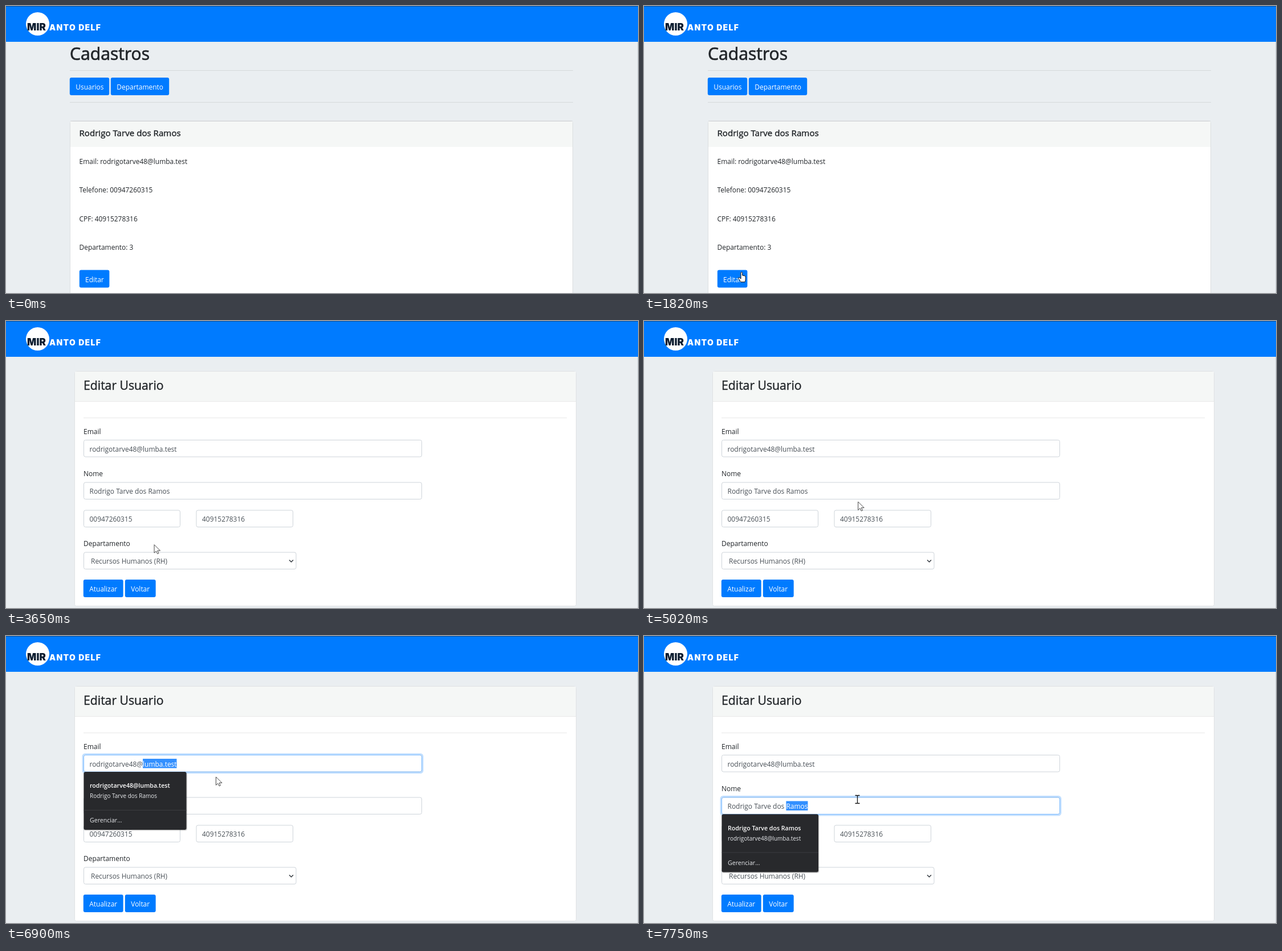
Write an HTML page that moves like this. It is 1109x505 px and loops after 8 s.

```html
<!DOCTYPE html>
<html lang="pt">
<head>
<meta charset="utf-8">
<title>Cadastros</title>
<style>
html, body { margin: 0; width: 100%; height: 100%; overflow: hidden; background: #eaeef1; }
svg { display: block; }
text { font: 11.95px "Open Sans", "Noto Sans", sans-serif; fill: #212529; white-space: pre; }
/* A thin outline stands for medium weight */
.h1, .h4, .h5 { stroke: #212529; stroke-width: .4px; }
.h1 { font-size: 30.1px; stroke-width: .7px; }
.h4 { font-size: 21.2px; }
.h5 { font-size: 15.1px; }
.val { fill: #495057; }
.on, .pick { fill: #fff; }
.strong { font-size: 10.6px; font-weight: 600; fill: #fff; }
.small { font-size: 10px; fill: #e8eaed; }
.menu { font-size: 10.6px; fill: #e8eaed; }
.url { font-size: 10px; fill: #a9abaf; }
.logo { font: 900 14px Inter, "Open Sans", sans-serif; letter-spacing: 1.3px; fill: #fff; }
.logo .dark { font-size: 17px; letter-spacing: .2px; fill: #0b1b2e; }
</style>
</head>
<body>
<script>
const NAME = ['Rodrigo Tarve dos ', 'Ramos'];
const MAIL = ['rodrigotarve48@', 'lumba.test'];
const PHONE = '00947260315', CPF = '40915278316';
const name = NAME.join(''), mail = MAIL.join('');

const rect = (x, y, w, h, fill, more = '') =>
  `<rect x="${x}" y="${y}" width="${w}" height="${h}" fill="${fill}" ${more}/>`;
const text = (x, y, s, cls = '') => `<text x="${x}" y="${y}" class="${cls}">${s}</text>`;
const line = (x, y, w) => rect(x, y, w, 1, '#000', 'opacity=".09"');
const group = (id, s) => `<g id="${id}">${s}</g>`;
const button = (x, y, w, s) => rect(x - .2, y - .4, w + .4, 30.8, '#007bff', 'rx="3"') + text(x + 10.3, y + 20.5, s, 'on');
const box = (x, y, w) => rect(x + .5, y + .5, w - 1, 29.5, '#fff', 'rx="3" stroke="#ced4da"');
const input = (x, y, w, s) => box(x, y, w) + text(x + 10.5, y + 20.5, s, 'val');

// Text field with focus glow, caret and a selectable last word
const field = (id, y, [head, tail]) => box(136, y, 594) +
  group(id + 'Glow',
    rect(134.8, y - 1.2, 596.4, 32.9, 'none', 'rx="4" stroke="#007bff" stroke-opacity=".25" stroke-width="2.5"') +
    rect(136.5, y + .5, 593, 29.5, 'none', 'rx="3" stroke="#80bdff"')) +
  `<text x="146.5" y="${y + 20.5}" class="val">${head}<tspan id="${id}Word">${tail}</tspan></text>` +
  rect(0, y + 7, 0, 16.5, '#3390ff', `id="${id}Mark"`) +
  `<text id="${id}Pick" y="${y + 20.5}" class="pick">${tail}</text>` +
  rect(0, y + 7, 1, 17, '#222', `id="${id}Caret"`);

const popup = (id, y, w, first, second) => group(id + 'Popup',
  rect(136, y + 1, w + 2, 102.5, '#000', 'rx="4" opacity=".2"') +
  rect(136.5, y, w, 102, '#28292c', 'rx="3"') +
  rect(136.5, y + 67, w, 1, '#3b3c40') +
  text(147, y + 28, first, 'strong') + text(147, y + 46, second, 'small') +
  text(147, y + 89, 'Gerenciar...', 'menu'));

const header = rect(0, 0, 1109, 63, '#007bff') + rect(0, 0, 1109, 1, '#0b4f99') +
  '<circle cx="55.5" cy="31.5" r="20.5" fill="#fff"/>' +
  '<text x="37" y="43" class="logo"><tspan class="dark">MIR</tspan><tspan x="76">ANTO DELF</tspan></text>';

const listPage = text(112, 95, 'Cadastros', 'h1') + line(112, 113, 883) +
  button(112, 126.5, 69, 'Usuarios') + button(184, 126.5, 102, 'Departamento') + line(112, 169, 883) +
  rect(112.5, 202.5, 882, 340, '#fff', 'rx="3" stroke="#dcdfe1"') +
  rect(113, 203, 881, 45, '#f5f7f6') + line(113, 202, 881) +
  text(128.5, 229, name, 'h5') +
  ['Email: ' + mail, 'Telefone: ' + PHONE, 'CPF: ' + CPF, 'Departamento: 3']
    .map((s, i) => text(128.5, 278 + i * 50.3, s)).join('') +
  group('ring', rect(127.3, 463.3, 55.9, 33.4, '#93c7ff', 'rx="4.5"') + rect(126.6, 462.6, 57.2, 34.8, '#93c7ff', 'rx="5"')) +
  button(129, 465, 52.2, '') +
  rect(128.8, 464.6, 52.6, 30.8, '#0069d9', 'rx="3" id="hover"') + text(139, 485.5, 'Editar', 'on');

const editPage = rect(120.5, 88.5, 880, 413, '#fff', 'rx="3" stroke="#dfe2e4"') +
  rect(121, 89, 879, 52, '#f5f7f6') + line(121, 141, 879) +
  text(136, 121, 'Editar Usuario', 'h4') + line(136, 170, 848) +
  text(136, 199, 'Email') + field('mail', 209, MAIL) +
  text(136, 273, 'Nome') + field('name', 283.5, NAME) +
  input(136, 332.5, 170, PHONE) + input(333.5, 332.5, 170.5, CPF) +
  text(136, 396, 'Departamento') + box(136, 406.5, 373.5) +
  text(149, 427, 'Recursos Humanos (RH)', 'val') +
  '<path d="M497 420.5l3.5 3.5 3.5-3.5" fill="none" stroke="#343a40" stroke-width="1.5"/>' +
  button(136, 455.5, 69.5, 'Atualizar') + button(209, 455.5, 53.5, 'Voltar') +
  popup('mail', 239, 180, mail, name) + popup('name', 313.5, 169.5, name, mail);

const cursor = group('cursor',
  '<circle id="click" cx="-1" cy="0" r="10.5" fill="#fff02e"/>' +
  '<path id="arrow" d="M.5.5V15l3.4-3.1L6.2 16.6l2.2-1L6.2 11H11Z" fill="#fff" stroke="#333" stroke-width=".9"/>' +
  '<path id="beam" d="M-4-7H-1Q0-7 0-6Q0-7 1-7H4M0-6V6M-4 7H-1Q0 7 0 6Q0 7 1 7H4" fill="none" stroke="#111" stroke-width="1.3"/>' +
  '<path id="hand" d="M-1.5 1.5Q-1.5.3-.2.3T1.2 1.5V6L5.2 6.8Q6.7 7.2 6.7 9V13Q6.7 15 5.4 17.6H-1.5Q-3.4 14.5-5.8 11.5Q-5.8 9.5-4 9.8L-1.5 12Z" fill="#fff" stroke="#111"/>');

document.body.innerHTML = '<svg width="1109" height="505">' + rect(0, 0, 1109, 505, '#eaeef1') + header +
  group('list', listPage) + group('edit', editPage) + rect(1108, 63, 1, 442, '#d3dae0') +
  group('status', rect(-4, 491.5, 124, 20, '#35363a', 'rx="3"') + text(0, 505, 'servidor:5050/alterar/52', 'url')) +
  cursor + '</svg>';

const el = id => document.getElementById(id);
const fade = (id, v) => el(id).setAttribute('opacity', +v);

function placeMarks(id) {
  const word = el(id + 'Word'), x = word.getStartPositionOfChar(0).x, w = word.getComputedTextLength();
  el(id + 'Mark').setAttribute('x', x);
  el(id + 'Mark').setAttribute('width', w);
  el(id + 'Pick').setAttribute('x', x);
  el(id + 'Caret').setAttribute('x', Math.round(x + w));
}
placeMarks('mail');
placeMarks('name');

// Pointer path: time, x, y
const PATH = [
  [200, 880, 446], [350, 570, 355], [580, 570, 355], [980, 294, 427], [1220, 294, 427],
  [1820, 171.5, 468], [2050, 165, 475], [2140, 165, 475], [2460, 163.5, 473], [3400, 163.5, 473],
  [3650, 259, 394], [3790, 342, 266], [3950, 342, 266], [4250, 341, 296], [4780, 374, 328],
  [4860, 376, 330], [5250, 374, 300], [5650, 366, 234], [5820, 365.5, 232.5], [6730, 365.5, 232.5],
  [7360, 374.5, 287.5], [8000, 374.5, 287.5]
];
const within = (v, a, b) => v >= a && v < b;
const ramp = (t, start) => Math.min(1, Math.max(0, (t - start) / 150));

function pointer(t) {
  const i = Math.max(1, PATH.findIndex(p => p[0] > t));
  const [t0, x0, y0] = PATH[i - 1], [t1, x1, y1] = PATH[i];
  const k = Math.max(0, (t - t0) / (t1 - t0));
  return [x0 + (x1 - x0) * k, y0 + (y1 - y0) * k];
}

function drawPointer(t) {
  const [x, y] = pointer(t);
  const overButton = t <= 3400 && within(x, 129, 182) && within(y, 465, 496);
  const overField = t > 3700 && (within(y, 209, 240) || within(y, 284, 314));
  el('cursor').setAttribute('transform', `translate(${x} ${y})`);
  fade('cursor', t >= 200);
  fade('hand', overButton);
  fade('beam', overField);
  fade('arrow', !overButton && !overField);
  fade('click', .85 * (within(t, 2460, 2620) || within(t, 6030, 6280) || within(t, 7510, 7690)));
}

function drawField(id, t, focus, { caret, pick, popup, end }) {
  const picked = within(t, pick, end);
  fade(id + 'Glow', focus);
  fade(id + 'Caret', within(t, caret, pick));
  fade(id + 'Mark', picked);
  fade(id + 'Pick', picked);
  fade(id + 'Popup', within(t, popup, end));
}

function draw(now) {
  const t = now % 8000;
  fade('list', t < 3110);
  fade('edit', t >= 3110);
  fade('hover', ramp(t, 1830));
  fade('ring', ramp(t, 2460));
  fade('status', t < 3330 ? ramp(t, 2200) : 0);
  drawField('mail', t, ramp(t, 6020) - ramp(t, 7500), { caret: 6030, pick: 6200, popup: 6030, end: 7510 });
  drawField('name', t, ramp(t, 7510), { caret: 7510, pick: 7690, popup: 7600, end: 8000 });
  drawPointer(t);
}

const start = performance.now();
function tick() {
  draw(performance.now() - start);
  requestAnimationFrame(tick);
}
tick();
</script>
</body>
</html>
```
